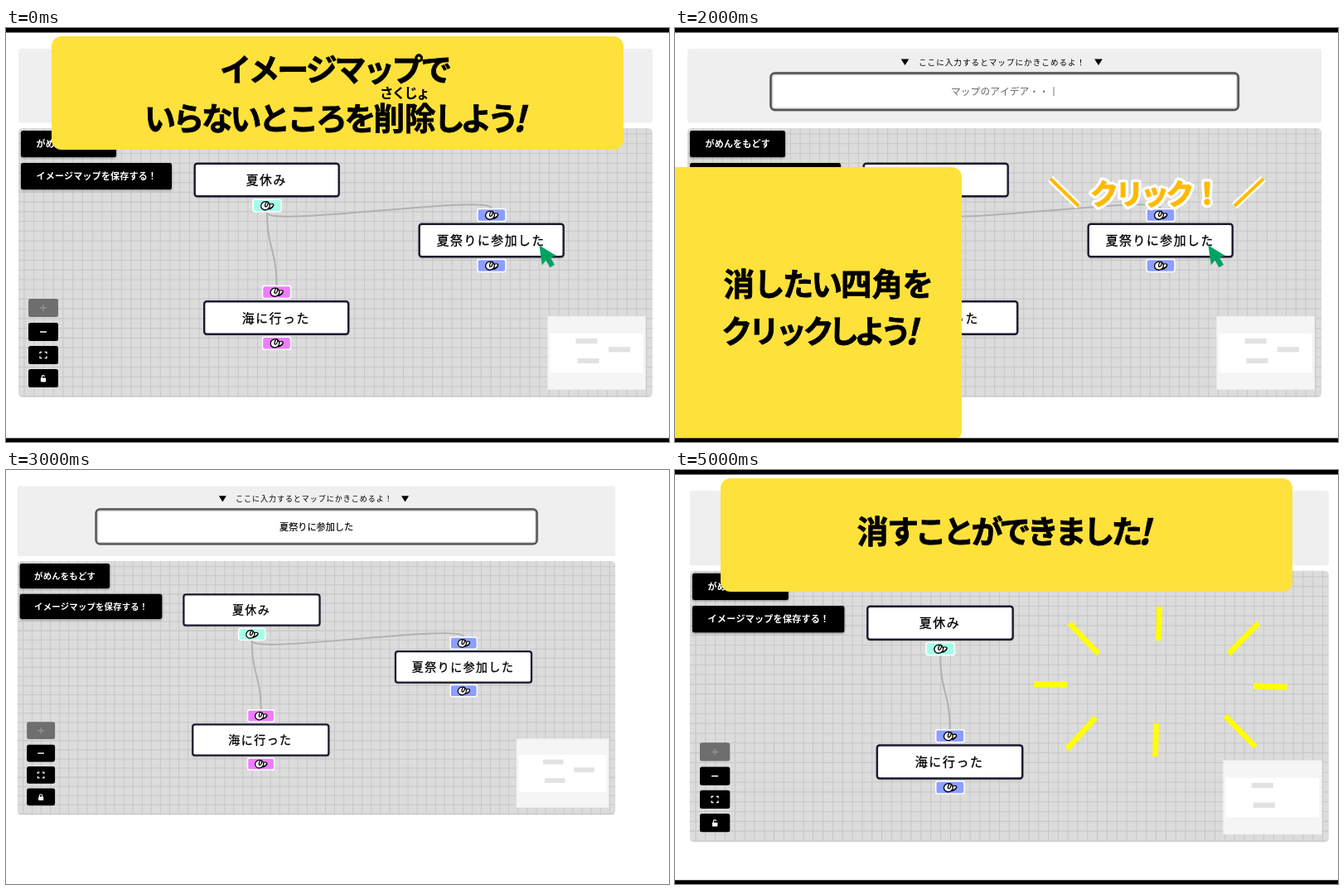
An HTML page with a canvas that plays this animation: 800x500 px, repeating every 6000 ms.

```html
<!DOCTYPE html>
<html lang="ja">
<head>
<meta charset="utf-8">
<title>イメージマップ</title>
<style>
html, body { margin: 0; width: 100%; height: 100%; overflow: hidden; background: #fff; }
canvas { display: block; width: 800px; height: 500px; }
</style>
</head>
<body>
<canvas id="stage" width="800" height="500"></canvas>
<script>
const ctx = document.getElementById('stage').getContext('2d');
const FONT = '"Noto Sans CJK JP", "Noto Sans CJK", sans-serif';
const YELLOW = '#ffe13b', INK = '#1a1a2e', BLUE = '#8c9eff', PINK = '#ee7cff', MINT = '#a5ffe9';
const STEP = 1000, LOOP = 6000;

function box(x, y, w, h, r, fill, stroke, lw = 1) {
  ctx.beginPath();
  ctx.roundRect(x, y, w, h, r);
  if (fill) { ctx.fillStyle = fill; ctx.fill(); }
  if (stroke) { ctx.strokeStyle = stroke; ctx.lineWidth = lw; ctx.stroke(); }
}

function poly(points, fill) {
  ctx.beginPath();
  points.forEach(([x, y]) => ctx.lineTo(x, y));
  ctx.closePath();
  ctx.fillStyle = fill;
  ctx.fill();
}

function lines(list, color, width) {
  ctx.strokeStyle = color;
  ctx.lineWidth = width;
  ctx.beginPath();
  for (const [x1, y1, x2, y2] of list) { ctx.moveTo(x1, y1); ctx.lineTo(x2, y2); }
  ctx.stroke();
}

// y is the vertical middle of the em box
function text(s, x, y, size, o = {}) {
  const { weight = 400, gap = 0, color = '#000', align = 'left', edge = 0, edgeColor = color } = o;
  ctx.font = `${weight} ${size}px ${FONT}`;
  ctx.letterSpacing = gap + 'px';
  ctx.textAlign = align;
  ctx.textBaseline = 'alphabetic';
  const left = align === 'center' ? x + gap / 2 : x, base = y + size * 0.38;
  if (edge) {
    ctx.lineJoin = 'round';
    ctx.lineWidth = edge;
    ctx.strokeStyle = edgeColor;
    ctx.strokeText(s, left, base);
  }
  ctx.fillStyle = color;
  ctx.fillText(s, left, base);
}

const heavy = (s, x, y, size, gap = 0, edge = 0.8) => text(s, x, y, size, { weight: 700, gap, edge });

function bang(x, y, size) {
  ctx.save();
  ctx.translate(x, y);
  ctx.transform(1, 0, -0.24, 1, 0, 0);
  text('!', 0, 0, size, { weight: 700, align: 'center', edge: 0.8 });
  ctx.restore();
}

function hand(x, y) {
  ctx.save();
  ctx.translate(x, y);
  ctx.strokeStyle = '#000';
  ctx.fillStyle = '#fff';
  ctx.lineWidth = 1.3;
  const oval = (...a) => { ctx.beginPath(); ctx.ellipse(...a, 0, 7); ctx.fill(); ctx.stroke(); };
  oval(4, 0.6, 4, 2.2, -0.5);
  oval(-2, 0.2, 5.4, 5, -0.3);
  oval(-0.6, -1.6, 1.5, 3.2, 0.35);
  ctx.beginPath();
  ctx.moveTo(1, 4);
  ctx.quadraticCurveTo(4.5, 4.5, 7, 1);
  ctx.stroke();
  ctx.restore();
}

function handle(x, y, color) {
  box(x - 17, y - 7.5, 34, 15, 2.5, color, '#fff', 1.5);
  hand(x, y);
}

function node(x, y, label) {
  ctx.save();
  ctx.shadowColor = 'rgba(0,0,0,.25)';
  ctx.shadowBlur = 3;
  ctx.shadowOffsetY = 1;
  box(x + 1.2, y + 1.2, 174, 39.6, 3, '#fff');
  ctx.restore();
  box(x + 1.2, y + 1.2, 174, 39.6, 3, null, INK, 2.4);
  text(label, x + 87, y + 21, 14.8, { weight: 500, gap: 1.6, align: 'center', edge: 0.3 });
}

function curve(x1, y1, x2, y2, bend) {
  ctx.strokeStyle = '#b1b1b5';
  ctx.lineWidth = 2;
  ctx.beginPath();
  ctx.moveTo(x1, y1);
  ctx.bezierCurveTo(x1, y1 + bend, x2, y2 - bend, x2, y2);
  ctx.stroke();
}

function button(y, w, label) {
  ctx.save();
  ctx.shadowColor = 'rgba(0,0,0,.4)';
  ctx.shadowBlur = 3;
  ctx.shadowOffsetY = 1;
  box(18, y, w, 32, 2.5, '#000');
  ctx.restore();
  text(label, 36.5, y + 16, 11, { weight: 700, gap: 0.2, color: '#fff' });
}

function controls(locked) {
  [327, 356, 384, 412].forEach((y, i) => box(27, y, 36, 22, 2.5, i ? '#000' : '#6e6e6e'));
  lines([[41, 338, 49, 338], [45, 334, 45, 342]], '#929292', 1.4);
  lines([[41, 367, 49, 367]], '#fff', 1.5);
  ctx.strokeStyle = '#fff';
  ctx.lineWidth = 1.3;
  ctx.beginPath();
  for (const sx of [-1, 1]) for (const sy of [-1, 1]) {
    ctx.moveTo(45 + sx * 4, 395 + sy * 1.5);
    ctx.lineTo(45 + sx * 4, 395 + sy * 3.6);
    ctx.lineTo(45 + sx * 1.7, 395 + sy * 3.6);
  }
  ctx.stroke();
  box(41.8, 422.6, 6.4, 4.8, 0.8, '#fff');
  ctx.lineWidth = 1.1;
  ctx.beginPath();
  ctx.arc(45, 421.4, 1.8, Math.PI, locked ? 0 : -0.3);
  if (locked) ctx.lineTo(46.8, 423);
  ctx.moveTo(43.2, 421.4);
  ctx.lineTo(43.2, 423);
  ctx.stroke();
}

function minimap(full) {
  box(653.5, 348.3, 118.3, 88.4, 0, '#f5f5f5');
  box(656.5, 369, 112, 47.5, 1.5, '#fff');
  const spots = [[687.5, 375], [689.5, 398.8]];
  if (full) spots.push([727, 385.2]);
  spots.forEach(([x, y]) => box(x, y, 26, 6.2, 0, '#e2e2e2'));
}

function header(value) {
  box(15, 25, 765, 89.5, 3, '#efefef');
  for (const x of [277.5, 511]) poly([[x - 4.8, 37.5], [x + 4.8, 37.5], [x, 45]], '#000');
  text('ここに入力するとマップにかきこめるよ！', 294, 41, 9.6, { weight: 500, gap: 1 });
  box(116, 55, 563.5, 43.5, 5, '#fff', '#cfcfcf', 4.5);
  box(115.5, 54.5, 564.2, 44.5, 5, null, '#505050', 2.4);
  if (value) text(value, 397.5, 77, 11.8, { weight: 500, align: 'center', edge: 0.2 });
  else {
    text('マップのアイデア・・', 333, 76.5, 11.8, { color: '#666' });
    lines([[457, 71, 457, 82]], '#777', 1);
  }
}

function grid() {
  ctx.save();
  box(15, 121, 765, 325, 5, '#dcdcdc');
  ctx.clip();
  const list = [], gap = 11.73;
  for (let x = 22; x < 780; x += gap) list.push([x, 121, x, 446]);
  for (let y = 128; y < 446; y += gap) list.push([15, y, 780, y]);
  lines(list, '#c8c8c8', 1.1);
  ctx.restore();
}

function board({ scale = 1, x = 0, y = 0, full = true, value = '', locked = false }) {
  ctx.save();
  ctx.translate(x, y);
  ctx.scale(scale, scale);
  header(value);
  grid();
  curve(315, 222, 326.5, 312, 45);
  if (full) curve(315, 223, 586, 218, 18);
  node(226.5, 162.5, '夏休み');
  handle(315, 214.5, MINT);
  node(238, 329, '海に行った');
  const low = full ? PINK : BLUE;
  handle(326.5, 319, low);
  handle(326.5, 380.7, low);
  if (full) {
    node(497.5, 235.5, '夏祭りに参加した');
    handle(586, 226, BLUE);
    handle(586, 287, BLUE);
  }
  button(124, 115, 'がめんをもどす');
  button(163, 182, 'イメージマップを保存する！');
  controls(locked);
  minimap(full);
  ctx.restore();
}

const cursor = () => poly([[643.5, 262.5], [664, 275], [657, 277.3], [662, 286], [656.5, 289.3],
  [651.5, 280.7], [646.8, 286.5]], '#00a264');

const banner = () => box(55, 10, 690, 137, 12, YELLOW);
const side = () => box(-20, 168, 366, 328, [0, 12, 8, 0], YELLOW);

function bars() {
  ctx.fillStyle = '#000';
  ctx.fillRect(0, 0, 800, 5.5);
  ctx.fillRect(0, 495.3, 800, 5);
}

function intro() {
  board({});
  cursor();
  banner();
  heavy('イメージマップで', 258, 50, 38, -3.4);
  text('さくじょ', 451, 79, 16.5, { weight: 700, gap: -1.8 });
  heavy('いらないところを', 167, 109, 38, -3.5);
  heavy('削除', 443.5, 109, 37.5);
  heavy('しよう', 516, 109, 38, -5.5);
  bang(623, 109, 42);
  bars();
}

function pick(pop) {
  board({});
  cursor();
  side();
  heavy('消', 58.5, 309, 37.5);
  heavy('したい', 95, 309, 37.5, -2.8);
  heavy('四角', 200, 309, 37.5);
  heavy('を', 274.5, 309, 37.5);
  heavy('クリック', 56, 366, 37.5, -4.7);
  heavy('しよう', 185, 366, 37.5, -6);
  bang(289, 366, 42);
  if (pop) callout();
  bars();
}

function callout() {
  const slashes = [[453, 182, 487, 215], [710, 182, 675, 215]], gold = '#ffb900';
  lines(slashes, '#fff', 9);
  lines(slashes, gold, 4);
  const look = { weight: 700, color: gold, edgeColor: '#fff', edge: 8 };
  const bold = { ...look, edgeColor: gold, edge: 1.3 };
  for (const o of [look, bold]) {
    text('クリック', 501, 200, 34, { ...o, gap: -3.5 });
    text('！', 642, 200, 35, { ...o, align: 'center' });
  }
}

function backspace() {
  board({});
  cursor();
  side();
  box(30, 265, 82.5, 74.5, 10, '#2b2b2b');
  const key = { weight: 700, color: '#fff', align: 'right' };
  text('BACK', 102, 286, 20, key);
  text('SPACE', 102, 308, 20, key);
  lines([[84, 330, 101, 330], [84, 330, 88.5, 326.5], [84, 330, 88.5, 333.5]], '#fff', 1.2);
  text('(', 128, 297, 28, { align: 'center' });
  text('Momvera', 196, 297, 26.5, { weight: 700, align: 'center' });
  text(')', 263.5, 297, 28, { align: 'center' });
  heavy('を', 269, 291, 43, 0, 0);
  heavy('クリック', 27, 377, 43, -4, 0);
  heavy('しよう', 183, 377, 43, -5, 0);
  bang(309, 377, 48);
  bars();
}

function done() {
  board({ scale: 1.0078, x: 2.8, y: -0.2, full: false });
  lines([[476, 185, 511, 222], [584.5, 165, 583.5, 206], [704, 185, 668, 222], [433, 258.5, 474, 259],
    [698, 261, 739, 262], [507.5, 299, 473, 337], [580.5, 306, 579.5, 346], [664, 297, 700, 334]], '#ff0', 6.8);
  banner();
  heavy('消', 219.5, 74, 38);
  heavy('すことができました', 256, 74, 38, -4.2);
  bang(570, 74, 42);
  bars();
}

const scenes = [
  intro,
  () => pick(false),
  () => pick(true),
  () => board({ scale: 0.943, x: -0.3, y: -4, value: '夏祭りに参加した', locked: true }),
  backspace,
  done
];

const start = performance.now();
function draw() {
  const t = Math.max(0, performance.now() - start) % LOOP;
  ctx.fillStyle = '#fff';
  ctx.fillRect(0, 0, 800, 500);
  scenes[Math.floor(t / STEP)]();
  requestAnimationFrame(draw);
}
draw();
</script>
</body>
</html>
```
